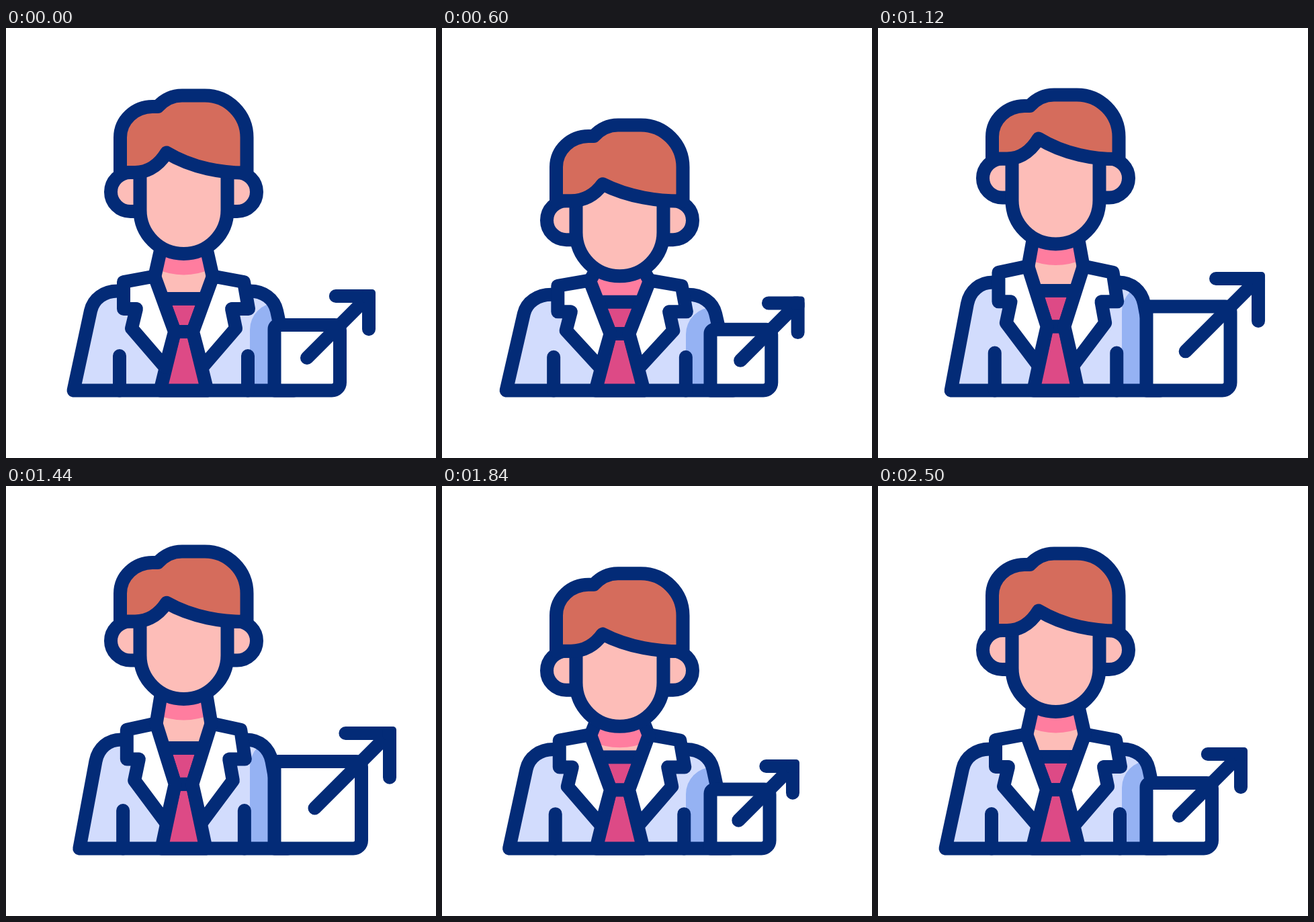
An HTML page with a canvas for the animation above (2.88 s loop, 640x640 px).

```html
<!DOCTYPE html>
<html lang="en">
<head>
<meta charset="utf-8">
<title>Professional growth icon</title>
<style>
  html, body { margin: 0; width: 100%; height: 100%; overflow: hidden; background: #fff; }
  canvas { display: block; width: 100vw; height: 100vh; }
</style>
</head>
<body>
<canvas id="stage" width="640" height="640"></canvas>
<script>
const ctx = document.getElementById('stage').getContext('2d');
const LOOP = 2880;
const CX = 264.5, BASE = 539.5;
const INK = '#032b77', SKIN = '#fdbdb8', HAIR = '#d56c5c', BLUSH = '#ff7d9f';
const COAT = '#d2dcfd', SHADE = '#95b2f3', TIE = '#dd4a86', WHITE = '#fff';

// Shared key times (ms) and one value per time for each moving part.
const TIMES = [220, 420, 480, 760, 1120, 1440, 1500, 1690, 1840, 2020, 2220, 2500];
const TRACKS = {
  body:   [0, -13.5, -11.5, 3.5, 12, 13, 10.5, -11, -0.5, 5, -2.5, 0],
  box:    [0, -13.5, -14, 9, 27.5, 32, 29, -14, -9.5, 14, 7, 0],
  arrow:  [0, -12, -16, 3, 26, 31, 30.5, -17, -18, 15, 9, 0],
  top:    [0, 61, 60, 17, -1, -3, -5, 50, 30, -5, 2, 0],
  ear:    [0, 69, 66, 6, -20.5, -13.5, -8, 62, 31, -9, 3, 0],
  chin:   [0, 48, 47, 9, -14.5, -19, -17, 42, 22, -9, 2, 0],
  fringe: [1, 0.67, 0.7, 1, 1.02, 0.94, 0.92, 0.74, 0.86, 1.02, 0.99, 1]
};

// Monotone cubic: flat at extremes, smooth in between.
function sample(values, t) {
  const last = TIMES.length - 1;
  if (t <= TIMES[0]) return values[0];
  if (t >= TIMES[last]) return values[last];
  const rate = i => (values[i + 1] - values[i]) / (TIMES[i + 1] - TIMES[i]);
  const slope = i => {
    if (i === 0 || i === last) return 0;
    const a = rate(i - 1), b = rate(i);
    return a * b <= 0 ? 0 : 2 * a * b / (a + b);
  };
  let i = 0;
  while (t > TIMES[i + 1]) i++;
  const span = TIMES[i + 1] - TIMES[i];
  const u = (t - TIMES[i]) / span, v = 1 - u;
  return values[i] * v * v * (1 + 2 * u) + slope(i) * span * u * v * v
       + values[i + 1] * u * u * (3 - 2 * u) - slope(i + 1) * span * u * u * v;
}

// Builds a path after passing each "x y" pair through a mapping.
function shape(d, map) {
  return new Path2D(d.replace(/([\d.]+) ([\d.]+)/g, (_, x, y) => map(+x, +y).join(' ')));
}

function paint(path, fill, stroke = true) {
  if (fill) {
    ctx.fillStyle = fill;
    ctx.fill(path);
  }
  if (stroke) ctx.stroke(path);
}

function rounded(x, y, w, h, r) {
  const path = new Path2D();
  path.roundRect(x, y, w, h, r);
  return path;
}

function drawBody(p) {
  const widen = p.body < 0 ? p.body : p.body * 0.68;
  const sx = (164 - widen) / 164, sy = (137 + p.body) / 137;
  const map = (x, y) => [CX + (x - CX) * sx, BASE + (y - BASE) * sy];
  const part = d => shape(d, map);

  // Neck and the shadow under the chin
  const [left, joint] = map(221, 371), [right] = map(308, 371);
  const [tieLeft, tieTop] = map(236, 403), [tieRight] = map(293, 403);
  const neckTop = 322 + p.chin;
  const neck = new Path2D(`M232 ${neckTop} L${left} ${joint} L${tieLeft} ${tieTop}
    L${tieRight} ${tieTop} L${right} ${joint} L297 ${neckTop} Z`);
  paint(neck, SKIN, false);
  ctx.save();
  ctx.clip(neck);
  paint(shape('M215 320 L215 355 Q264.5 380 314 355 L314 320 Z', (x, y) => [x, y + p.chin]), BLUSH, false);
  ctx.restore();

  // Coat with the shade cast by the box
  const coat = part(`M100.5 539.5 L126 421 C130 403 146 391.5 166 391.5 L175 391.5
    L221 371 L236 403 L293 403 L308 371 L354 391.5 L363 391.5
    C383 391.5 399 403 403 421 L428.5 539.5 Z`);
  paint(coat, COAT, false);
  ctx.save();
  ctx.clip(coat);
  paint(rounded(363, 409 - p.box, 120, 300, 40), SHADE, false);
  ctx.restore();
  paint(part(`M175 391.5 L166 391.5 C146 391.5 130 403 126 421 L100.5 539.5
    L428.5 539.5 L403 421 C399 403 383 391.5 363 391.5 L358 391.5`));
  paint(part('M169 488 L169 539.5 M360 488 L360 539.5'));

  // Tie, lapels and neck sides
  paint(part('M251 452 L278 452 L299.5 539.5 L229.5 539.5 Z'), TIE);
  paint(part('M233 403 L296 403 L278 452 L251 452 Z'), TIE);
  paint(part('M175 378 L221 369.5 L251 452 L237 505 L187 447 L194 418 L175 418 Z'), WHITE);
  paint(part('M354 378 L308 369.5 L278 452 L292 505 L342 447 L336 418 L361 418 Z'), WHITE);
  paint(new Path2D(`M232 ${neckTop} L${left} ${joint} M297 ${neckTop} L${right} ${joint}`));
}

function drawBox(p) {
  const size = 97.5 + p.box;
  paint(rounded(399.5, BASE - size, size, size, [6, 8, 12, 0]), WHITE);

  const d = p.arrow;
  const tipX = 540 + d, tipY = 399 - d, barb = 49.2 + d * 0.53;
  paint(new Path2D(`M${448 + d * 0.37} ${491 - d * 0.37} L${tipX} ${tipY}
    M${tipX - barb} ${tipY} H${tipX} V${tipY + barb}`));
  paint(rounded(tipX - 10, tipY - 10, 20, 20, 5), INK, false);
}

function drawHead(p) {
  const earMap = (x, y) => [x, y + p.ear];
  paint(shape('M199.5 215 L185 215 C169 215 156 228 156 244 C156 260 169 273 185 273 L199.5 273', earMap), SKIN);
  paint(shape('M329.5 215 L344 215 C360 215 373 228 373 244 C373 260 360 273 344 273 L329.5 273', earMap), SKIN);

  paint(shape(`M199.5 188 L199.5 271 C199.5 307 228.6 336 264.5 336
    C300.4 336 329.5 307 329.5 271 L329.5 188`, (x, y) => [x, y + p.chin]), SKIN);

  // The crown follows the top; the fringe follows the ears.
  const hairMap = (x, y) => [x, y < 170 ? y + p.top : 215 + p.ear + (y - 215) * p.fringe];
  paint(shape(`M170 215 L170 163 C170 137 192 117 218 117 L226 117
    C236 106 248 100.5 262 100.5 L296 100.5 C330.5 100.5 358.5 128.5 358.5 163
    L358.5 215.5 C323 216 278 209 239 185.5 C224 210 205 215 192 215 Z`, hairMap), HAIR);
}

function draw(t) {
  const pose = {};
  for (const name in TRACKS) pose[name] = sample(TRACKS[name], t);
  ctx.fillStyle = WHITE;
  ctx.fillRect(0, 0, 640, 640);
  ctx.strokeStyle = INK;
  ctx.lineWidth = 20;
  ctx.lineCap = ctx.lineJoin = 'round';
  drawBody(pose);
  drawBox(pose);
  drawHead(pose);
}

const start = performance.now();
function tick() {
  draw((performance.now() - start) % LOOP);
  requestAnimationFrame(tick);
}
tick();
</script>
</body>
</html>
```
